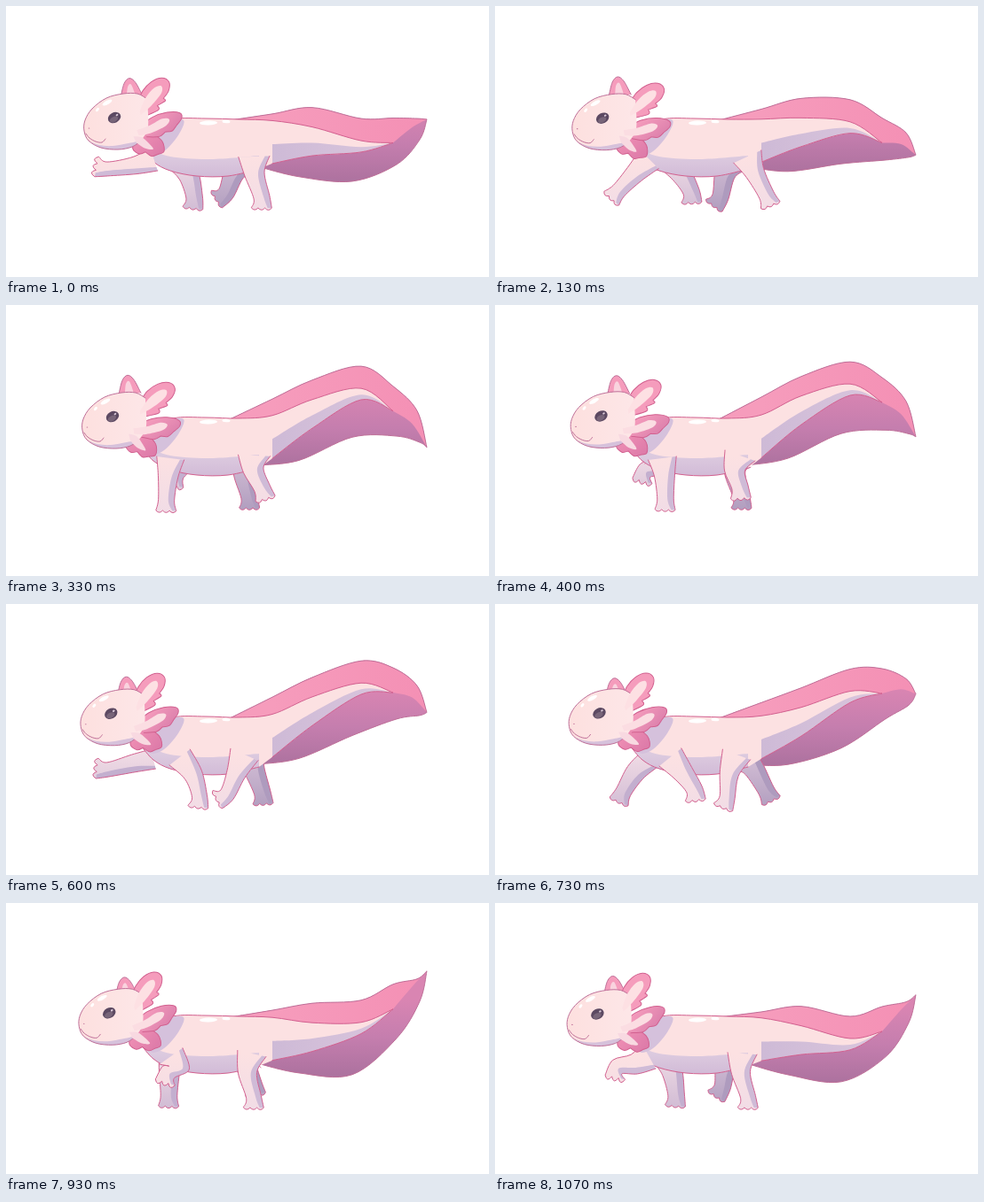
Write an HTML page with a canvas that moves like this. It is 544 px wide and 306 px high and loops after 1140 ms.

```html
<!DOCTYPE html>
<html lang="en">
<head>
<meta charset="utf-8">
<title>Walking axolotl</title>
<style>
html, body { margin: 0; width: 100%; height: 100%; overflow: hidden; background: #fff; }
canvas { display: block; width: 544px; height: 306px; }
</style>
</head>
<body>
<canvas id="stage" width="544" height="306"></canvas>
<script>
const ctx = document.getElementById('stage').getContext('2d');
const LOOP = 1140, STEPS = 17;
const LINE = '#d2608f', SOFT_LINE = '#bf6f98', SKIN = '#fce1e2', SHADE = '#cfbbd7';

// One stride per leg type: step, knee x, y, ankle x, y, foot direction in degrees.
const FRONT_STRIDE = [
  [0, 145, 180, 114, 184, 192], [3, 165, 194, 155, 218, 103], [6, 191, 193, 192, 219, 92],
  [9, 211, 193, 218, 217, 98], [12, 210, 190, 221, 204, 80], [14, 195, 186, 183, 191, 108],
  [16, 157, 182, 138, 185, 103]
];
const HIND_STRIDE = [
  [0, 280, 190, 288, 216, 91], [3, 295, 188, 309, 212, 62], [6, 270, 187, 276, 206, 86],
  [9, 259, 192, 249, 215, 152], [12, 267, 192, 270, 219, 91], [14, 272, 192, 279, 219, 91],
  [16, 277, 192, 285, 219, 91]
];

const mix = (a, b, t) => a.map((v, i) => v + (b[i] - v) * t);

// Cyclic motion: a fundamental and an optional second harmonic.
function wave(step, mean, amp, lag, amp2 = 0, lag2 = 0) {
  const k = 2 * Math.PI / STEPS;
  return mean + amp * Math.cos(k * (step - lag)) + amp2 * Math.cos(2 * k * (step - lag2));
}

// Cyclic Hermite blend between the key points of a stride.
function strideAt(keys, step) {
  const n = keys.length;
  const row = i => keys[(i + n) % n];
  const time = i => row(i)[0] + STEPS * Math.floor(i / n);
  let i = n - 1;
  while (keys[i][0] > step) i--;
  const span = time(i + 1) - time(i), u = (step - time(i)) / span;
  const u2 = u * u, u3 = u2 * u;
  const slope = (j, c) => (row(j + 1)[c] - row(j - 1)[c]) / (time(j + 1) - time(j - 1));
  return [1, 2, 3, 4, 5].map(c =>
    row(i)[c] * (2 * u3 - 3 * u2 + 1) + row(i + 1)[c] * (3 * u2 - 2 * u3) +
    span * (slope(i, c) * (u3 - 2 * u2 + u) + slope(i + 1, c) * (u3 - u2)));
}

function spline(path, pts, join) {
  path[join ? 'lineTo' : 'moveTo'](...pts[0]);
  for (let i = 0; i < pts.length - 1; i++) {
    const a = pts[i - 1] || pts[i], b = pts[i], c = pts[i + 1], d = pts[i + 2] || c;
    path.bezierCurveTo(b[0] + (c[0] - a[0]) / 6, b[1] + (c[1] - a[1]) / 6,
      c[0] - (d[0] - b[0]) / 6, c[1] - (d[1] - b[1]) / 6, c[0], c[1]);
  }
  return path;
}

// One path made of splines that meet in corners.
function shape(...runs) {
  const path = new Path2D();
  runs.forEach((r, i) => spline(path, r, i > 0));
  return path;
}

function paint(path, fill, line) {
  if (fill) { ctx.fillStyle = fill; ctx.fill(path); }
  if (line) { ctx.strokeStyle = line; ctx.stroke(path); }
}

function fade(x0, y0, x1, y1, ...colors) {
  const g = ctx.createLinearGradient(x0, y0, x1, y1);
  colors.forEach((c, i) => g.addColorStop(i / (colors.length - 1), c));
  return g;
}

function oval(x, y, rx, ry, deg, fill) {
  ctx.beginPath();
  ctx.ellipse(x, y, rx, ry, deg * Math.PI / 180, 0, 7);
  ctx.fillStyle = fill;
  ctx.fill();
}

function toes(path, a, b, size) {
  const dx = b[0] - a[0], dy = b[1] - a[1], len = Math.hypot(dx, dy);
  const at = (t, out) => [a[0] + dx * t - dy / len * out, a[1] + dy * t + dx / len * out];
  for (let i = 0; i < 3; i++) {
    path.quadraticCurveTo(...at((i + 0.5) / 3, size), ...at((i + 1) / 3, 0));
  }
}

// A limb swept along hip, knee, ankle and foot; it thins as it stretches.
function leg(stride, step, hip, rootWidth, fill, shade) {
  const [kx, ky, ax, ay, deg] = strideAt(stride, step % STEPS);
  const a = deg * Math.PI / 180;
  const root = [hip[0] + (ax - hip[0]) * 0.28, hip[1]];
  const bones = [root, [kx, ky], [ax, ay], [ax + 12 * Math.cos(a), ay + 12 * Math.sin(a)]];
  const length = Math.hypot(kx - root[0], ky - root[1]) + Math.hypot(ax - kx, ay - ky);
  const slim = Math.min(1, 46 / length);
  const half = [rootWidth * slim, 11.5 * slim, 9.3 * slim, 11.5];
  const side = sign => bones.map((p, i) => {
    const from = bones[i === 3 ? 2 : Math.max(0, i - 1)], to = bones[Math.min(3, i + 1)];
    const dx = to[0] - from[0], dy = to[1] - from[1], w = sign * half[i] / Math.hypot(dx, dy);
    return [p[0] - dy * w, p[1] + dx * w];
  });
  const front = side(1), back = side(-1).reverse();
  const path = spline(new Path2D(), front);
  toes(path, front[3], back[0], Math.max(4.5, 4.5 + (212 - ay) * 0.15));
  spline(path, back, true);
  paint(path, fill);
  const edge = back.map((p, i) => mix(p, front[3 - i], [0.2, 0.38, 0.32, 0.15][i]));
  paint(shape(back, edge.reverse()), shade);
  paint(path, null, LINE);
}

// The tail is a wave running from the hips to the tip.
function tailPose(step) {
  const spine = [
    [300, wave(step, 151, 3, -1.3)],
    [345, wave(step, 136, 19, -1.3)],
    [400, wave(step, 121, 33, -0.7, 6, -0.5)],
    [436, wave(step, 123, 29, 1, 6, 1)]
  ];
  const shift = (p, sign, extra = 0) =>
    [p[0], p[1] + sign * ((436 - p[0]) * 0.178 + extra)];
  const end = [474, wave(step, 126, 44, 4.2, 12, 2)];
  const crest = shift(spine[3], -1, 28);
  const rim = [463, crest[1] + (end[1] - crest[1]) * 0.4];
  const keel = [440, wave(step, 151, 25, 0.8, 4, 0)];
  return {
    spine, rim, end,
    coreTop: spine.map(p => shift(p, -1)),
    coreLow: spine.map(p => shift(p, 1)).reverse(),
    finTop: [[252, 129], [300, wave(step, 113, 10, -1.3)], shift(spine[1], -1, 22),
      shift(spine[2], -1, 25), crest, rim, end],
    finLow: [end, [466, keel[1] + (end[1] - keel[1]) * 0.55], keel,
      [390, wave(step, 170, 29, -1.3, 3, -1)], [330, wave(step, 183, 11, -1.3)], [283, 181]]
  };
}

function tailFin({ spine, rim, end, finTop, finLow }) {
  const whole = shape(finTop, finLow);
  const bottom = Math.max(...finLow.map(p => p[1]));
  const tip = spine[3];
  paint(whole, fade(0, bottom - 85, 0, bottom, '#d985b2', '#c57eae', '#ad729f'));
  paint(shape(finTop, [end, mix(mix(end, tip, 0.5), rim, 0.3), tip], [...spine].reverse()),
    fade(300, 0, 485, 0, '#f69cbc', '#f48fb4'));
  paint(whole, null, SOFT_LINE);
}

function body({ spine, coreTop, coreLow }) {
  const top = [[160, 142], [188, 128], [225, 127], [262, 128], ...coreTop];
  const belly = [[285, 184], [250, 192], [215, 192], [185, 186], [166, 176], [152, 160]];
  paint(shape(top, coreLow, belly), SKIN);
  const rim = spine.map((p, i) => mix(p, coreLow[3 - i], 0.1));
  paint(shape(coreLow, rim), fade(290, 0, 430, 0, '#cdb9d6', '#d9c5dc'));
  paint(shape([[158, 160], [185, 170], [230, 173], [285, 169]], belly),
    fade(0, 170, 0, 193, '#dccadf', '#d2bbd7'));
  paint(shape(top, coreLow), null, LINE);
  paint(shape(belly), null, LINE);
  oval(228, 132, 10, 2.4, -2, '#fff');
  oval(248, 130.5, 4.5, 1.8, 4, '#fff');
}

function turned(angle, drawParts) {
  ctx.save();
  ctx.translate(150, 130);
  ctx.rotate(angle * Math.PI / 180);
  ctx.translate(-150, -130);
  drawParts();
  ctx.restore();
}

function farGill(lift) {
  ctx.save();
  ctx.translate(0, lift);
  paint(shape([[129, 103], [133, 87], [139, 81], [146, 86], [154, 101]]), '#f59cbc', SOFT_LINE);
  paint(shape([[136, 103], [137, 91], [141, 88], [146, 101]]), '#f9d3de');
  ctx.restore();
}

function gills() {
  paint(shape([[152, 146], [145, 151], [142, 160], [149, 166], [156, 164]],
    [[156, 164], [163, 169], [170, 167]], [[170, 167], [177, 164], [175, 152], [162, 141]]),
    fade(145, 148, 170, 170, '#ef8fb4', '#dd7ba9'), LINE);
  paint(shape([[152, 134], [165, 125], [182, 120], [196, 121], [198, 127], [192, 135]],
    [[192, 135], [187, 141], [179, 142]], [[179, 142], [172, 147], [158, 147]]),
    fade(165, 122, 190, 145, '#f59cbc', '#da7eab'), LINE);
  paint(shape([[150, 106], [155, 95], [165, 85], [177, 81], [185, 86], [184, 96], [178, 104]],
    [[178, 104], [180, 107], [171, 112]], [[171, 112], [172, 117], [156, 124]]), '#f59cbc', LINE);
}

function gillStems() {
  paint(shape([[151, 118], [158, 103], [168, 92], [176, 90], [176, 98], [164, 112], [152, 122]]), '#fde0e3');
  paint(shape([[147, 139], [162, 134], [176, 127], [184, 128], [180, 135], [162, 143], [149, 145]]), '#fbdde2');
  paint(shape([[143, 146], [152, 147], [160, 154], [165, 161], [156, 160], [146, 153]]), '#f8d9e1');
}

function face() {
  oval(122, 125, 7.6, 5.8, -28, '#5c4962');
  oval(121.5, 127, 5, 3, -28, '#786579');
  oval(125, 122, 1.4, 1, -28, '#d9c9d8');
  oval(114, 108, 6, 2.2, -28, '#fff');
  oval(103, 116, 2.5, 1.5, -48, '#fff');
  oval(93.5, 137, 0.8, 0.6, 0, SOFT_LINE);
  paint(shape([[90, 143], [94, 148], [101, 152], [108, 153], [112, 149]]), null, SOFT_LINE);
}

function head(step) {
  const angle = wave(step, 1, 8, 4, 4, 3.5);
  ctx.save();
  ctx.translate(-0.41 * step, wave(step, 0, 1.7, 2.5));
  farGill(wave(step, 0.7, -4, 3.5));
  turned(angle, gills);
  const skull = [[159, 104], [148, 98], [132, 98], [113, 103], [97, 115], [89, 128],
    [88, 140], [93, 151], [107, 159], [126, 161], [142, 158], [152, 151]];
  const jaw = skull.slice(7);
  paint(shape(skull, [[152, 151], [160, 136], [159, 104]]), fade(90, 0, 155, 0, '#fde0df', '#fde6e7'));
  paint(shape(jaw, [[152, 151], [138, 154], [120, 157], [105, 156], [93, 151]]), '#d6c1db');
  paint(shape(skull), null, SOFT_LINE);
  turned(angle, gillStems);
  face();
  ctx.restore();
}

function draw(step) {
  ctx.fillStyle = '#fff';
  ctx.fillRect(0, 0, 544, 306);
  ctx.lineWidth = 1;
  ctx.lineJoin = ctx.lineCap = 'round';
  const tail = tailPose(step), opposite = step + STEPS / 2;
  tailFin(tail);

  ctx.save();
  ctx.translate(-3, -2);
  leg(HIND_STRIDE, opposite, [277, 180], 14, fade(0, 185, 0, 235, '#cdb8d1', '#b09dbe'), '#ae9bbe');
  leg(FRONT_STRIDE, opposite, [189, 177], 13, fade(0, 170, 0, 235, '#f1dce5', '#d0bbd4'), '#c3afcf');
  ctx.restore();

  body(tail);
  const skin = fade(0, 170, 0, 235, SKIN, '#f1dce6');
  leg(HIND_STRIDE, step, [276, 170], 18, skin, SHADE);
  leg(FRONT_STRIDE, step, [187, 173], 16, skin, SHADE);
  paint(shape([[180, 129], [200, 129], [194, 146], [178, 164], [163, 168], [158, 150], [180, 129]]), '#d5c1dc');
  head(step);
}

// Steps fall on a 10 ms grid, fifteen per second.
const startOf = k => Math.round(k * 20 / 3) * 10;

function tick() {
  const t = performance.now() % LOOP;
  let step = STEPS - 1;
  while (startOf(step) > t) step--;
  draw(step);
  requestAnimationFrame(tick);
}
tick();
</script>
</body>
</html>
```
